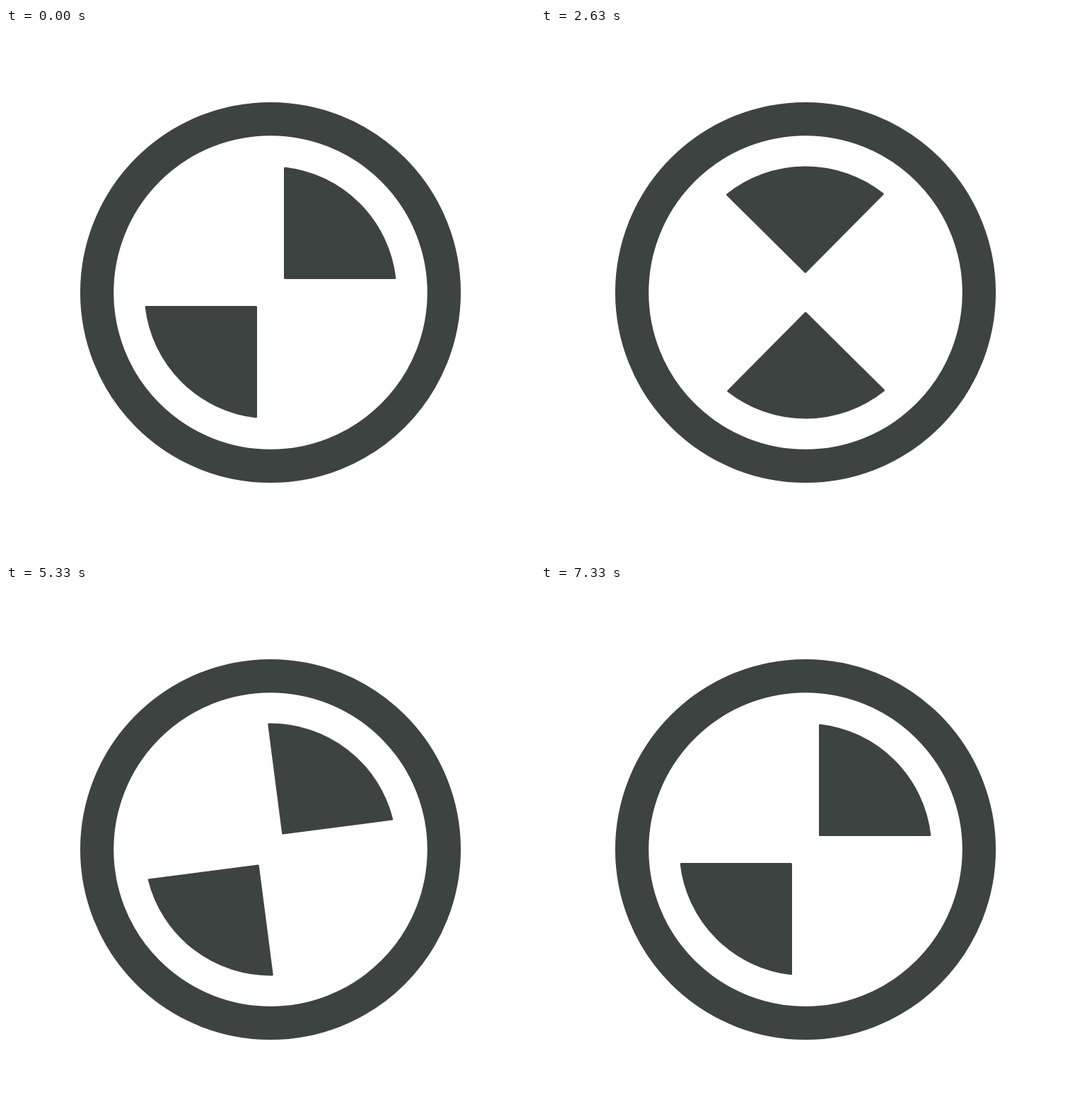
An HTML page for the animation above (7710 ms loop, 748 by 748 pixels).

```html
<!DOCTYPE html>
<html lang="en">
<head>
<meta charset="utf-8">
<title>Turning quadrants</title>
<style>
  html, body { margin: 0; width: 100%; height: 100%; overflow: hidden; background: #fff; }
  svg { display: block; width: 100%; height: 100%; }
  .ring { fill: none; stroke: #3d4341; stroke-width: 47.3; }
  .wedge { fill: #3d4341; stroke: #3d4341; stroke-width: 3; stroke-linejoin: round; }
</style>
</head>
<body>
<svg viewBox="-374 -374 748 748">
  <defs>
    <path id="wedge" class="wedge" d="M20.5-20.5V-175.8A177 177 0 0 1 175.8-20.5Z"/>
  </defs>
  <circle class="ring" r="245.4"/>
  <g id="rotor">
    <use href="#wedge"/>
    <use href="#wedge" transform="rotate(180)"/>
  </g>
</svg>
<script>
  const LOOP = 7710, RUN = 3500, SECOND_START = 3833.3, FRAME = 100 / 3;
  const rotor = document.getElementById('rotor');

  // Cubic easing with flat ends; x1 and x2 are the handle positions.
  function ease(x, x1, x2) {
    let lo = 0, hi = 1, s = 0.5;
    for (let i = 0; i < 30; i++) {
      s = (lo + hi) / 2;
      const u = 1 - s;
      if (3 * s * u * u * x1 + 3 * s * s * u * x2 + s * s * s < x) lo = s;
      else hi = s;
    }
    return s * s * (3 - 2 * s);
  }

  // Two half turns, each with a long slow finish.
  function angle(ms) {
    if (ms <= 0 || ms >= RUN) return 0;
    return ms < 2000
      ? 180 * ease(ms / 2000, 0.35, 0.21)
      : 180 + 180 * ease((ms - 2000) / 1500, 0.33, 0.13);
  }

  // The first run steps at 20 poses a second, the second at 30.
  function poseTime(t) {
    if (t < 3800) {
      return Math.min(RUN, Math.floor(t / 100) * 100 + (t % 100 >= 30 ? 50 : 0));
    }
    return Math.min(RUN, Math.floor((t + 3.5 - SECOND_START) / FRAME) * FRAME);
  }

  const start = performance.now();
  function draw(now) {
    const t = Math.max(0, now - start) % LOOP;
    rotor.setAttribute('transform', `rotate(${angle(poseTime(t)).toFixed(3)})`);
    requestAnimationFrame(draw);
  }
  draw(start);
</script>
</body>
</html>
```
